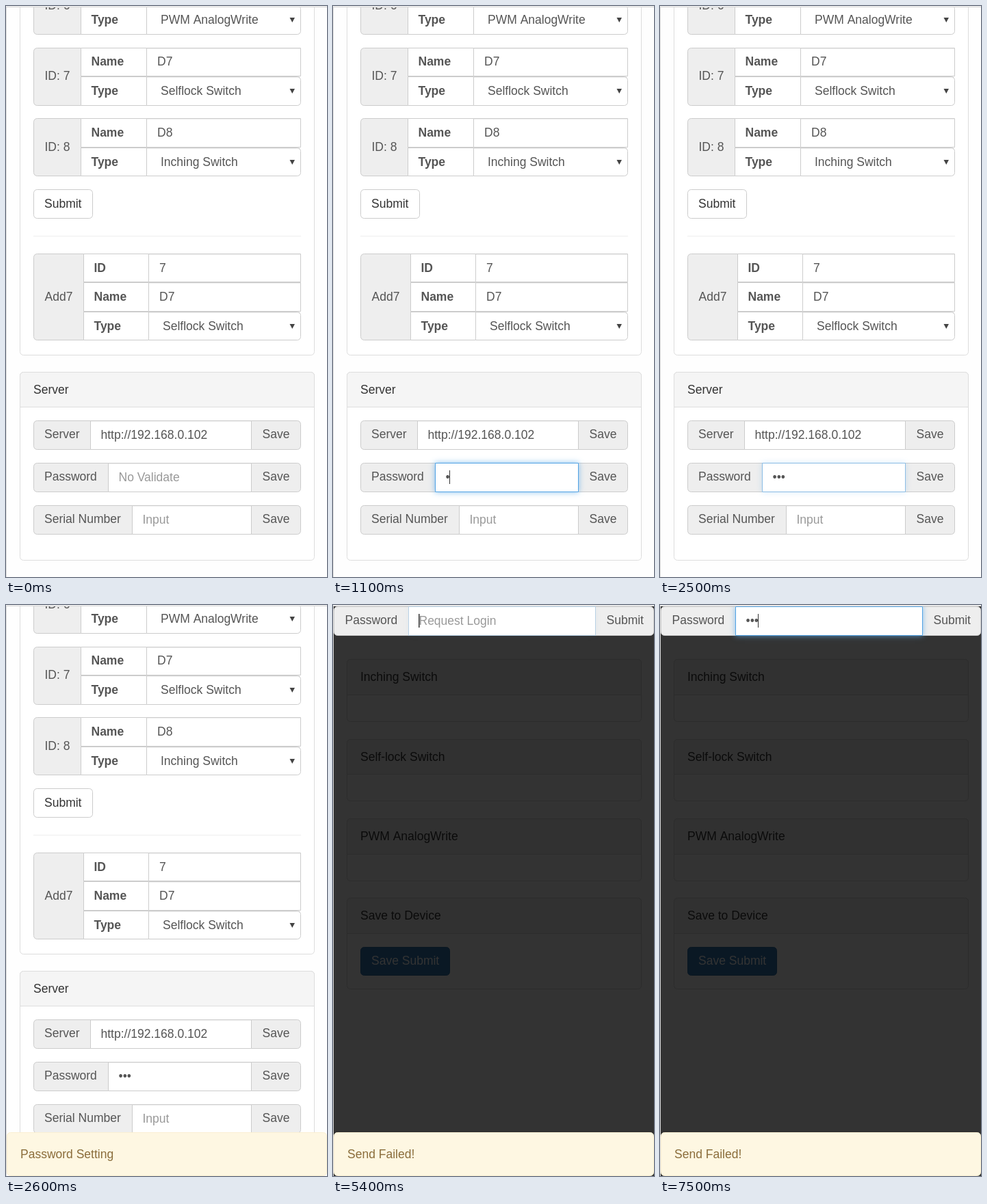
Recreate the animation shown at these times as an HTML page with a canvas. Size 469 px wide and 835 px high, loop 8 s.

```html
<!DOCTYPE html>
<html lang="en">
<head>
<meta charset="utf-8">
<title>Device settings</title>
<style>
html, body { margin: 0; width: 100%; height: 100%; overflow: hidden; background: #fff; }
canvas { display: block; }
</style>
</head>
<body>
<canvas id="stage" width="469" height="835"></canvas>
<script>
const ctx = document.getElementById('stage').getContext('2d');
const W = 469, H = 835, LOOP = 8000;
const GREY = '#555', HINT = '#999', LINE = '#ccc', ADDON = '#eee';
const LEFT = [5, 0, 0, 5], RIGHT = [0, 5, 5, 0];

function rect(x, y, w, h, color) {
  ctx.fillStyle = color;
  ctx.fillRect(x, y, w, h);
}

// Bordered box covering pixels x0..x1, y0..y1 (end exclusive)
function box(x0, y0, x1, y1, fill = '#fff', radii = 0, border = LINE) {
  ctx.beginPath();
  ctx.roundRect(x0 + .5, y0 + .5, x1 - x0 - 1, y1 - y0 - 1, radii);
  ctx.fillStyle = fill;
  ctx.fill();
  ctx.strokeStyle = border;
  ctx.stroke();
}

function text(str, x, y, color = GREY, weight = '') {
  ctx.font = `${weight} 17.5px "Liberation Sans", Arial, sans-serif`;
  ctx.fillStyle = color;
  ctx.fillText(str, x, y);
}

function arrow(y) {
  ctx.fillStyle = '#444';
  ctx.beginPath();
  ctx.moveTo(414.5, y - 3);
  ctx.lineTo(422, y - 3);
  ctx.lineTo(418.25, y + 4);
  ctx.fill();
}

function input(x0, y0, x1, y1, radii) {
  box(x0, y0, x1, y1, '#fff', radii);
  rect(x0 + 1, y0 + 1, x1 - x0 - 2, 1, 'rgba(0,0,0,.06)');
}

// Label column with name/value rows; the last row is a select
function group(y, label, nameX, valueX, rows) {
  const top = i => Math.floor(y + 42.5 * i), n = rows.length;
  box(40, top(0), nameX + 1, top(n), ADDON, LEFT);
  text(label, 56.5, Math.round(y + 21.25 * n + 4.9));
  rows.forEach(([name, value], i) => {
    const select = i === n - 1, base = Math.round(y + 42.5 * i + 26.4);
    box(nameX, top(i), valueX + 1, top(i + 1));
    input(valueX, top(i), 431, top(i + 1), select ? RIGHT : 0);
    text(name, nameX + 15.5, base, GREY, 'bold');
    text(value, valueX + (select ? 21 : 16), base);
    if (select) arrow(base - 6);
  });
}

function panel(y0, y1, headerHeight, title) {
  box(20, y0, 451, y1, '#fff', 5, '#ddd');
  box(20, y0, 451, y0 + headerHeight, '#f5f5f5', [5, 5, 0, 0], '#ddd');
  text(title, 40, y0 + 32 - (y0 < 200 && y0 > 190 ? 0 : 0), '#333');
}

function serverRow(y, label, inputX, value, color) {
  box(40, y, inputX + 1, y + 43, ADDON, LEFT);
  box(358, y, 431, y + 43, ADDON, RIGHT);
  input(inputX, y, 359, y + 43);
  text(label, 56, y + 26);
  text('Save', 374.5, y + 26);
  text(value, inputX + 15.5, y + 27, color);
}

// Password field with focus glow, bullets and caret
function passwordField(x0, y0, x1, hint, state) {
  const { focus, dots, caret } = state, y1 = y0 + 43, textX = x0 + 15.5;
  if (focus) {
    ctx.save();
    ctx.shadowColor = `rgba(102,175,233,${.8 * focus * focus})`;
    ctx.shadowBlur = 8;
    rect(x0, y0, x1 - x0, y1 - y0, '#fff');
    ctx.restore();
  }
  input(x0, y0, x1, y1);
  if (focus) box(x0, y0, x1, y1, '#fff', 0, `rgba(82,163,228,${focus})`);
  text(dots ? '•'.repeat(dots) : hint, textX, y0 + 27, dots ? GREY : HINT);
  if (caret) rect(Math.floor(textX + 6 * dots - (dots ? .5 : 0)), y0 + 11, dots ? 1 : 1.5, 20, '#333');
}

function alertBar(message) {
  box(1, 771, W, H, '#fef7e2', 5, '#faefd2');
  text(message, 21, 809, '#8a6d3b');
}

function settingsPage(t) {
  box(20, -20, 451, 511, '#fff', 5, '#ddd');
  const columns = (name, type) => [['Name', name], ['Type', type]];
  group(-42.6, 'ID: 6', 109, 205, columns('D6', 'PWM AnalogWrite'));
  group(61, 'ID: 7', 109, 205, columns('D7', 'Selflock Switch'));
  group(164.6, 'ID: 8', 109, 205, columns('D8', 'Inching Switch'));
  box(40, 268, 127, 311, '#fff', 5);
  text('Submit', 56, 295, '#333');
  rect(40, 336, 391, 1, '#eee');
  group(362.2, 'Add7', 113, 208, [['ID', '7'], ...columns('D7', 'Selflock Switch')]);

  panel(535, 811, 52, 'Server');
  serverRow(606, 'Server', 123, 'http://192.168.0.102', GREY);
  serverRow(668, 'Password', 149, '', HINT);
  serverRow(730, 'Serial Number', 184, 'Input', HINT);
  passwordField(149, 668, 359, 'No Validate', {
    focus: t < 600 ? 0 : t < 700 ? .3 : t < 2500 ? 1 : t < 2600 ? .6 : 0,
    dots: t < 1100 ? 0 : t < 1400 ? 1 : t < 1600 ? 2 : 3,
    caret: t >= 600 && t < 2100
  });
  if (t >= 2600) alertBar('Password Setting');
}

function loginPage(t) {
  panel(79, 171, 53, 'Inching Switch');
  panel(196, 287, 52, 'Self-lock Switch');
  panel(312, 404, 53, 'PWM AnalogWrite');
  panel(428, 562, 53, 'Save to Device');
  box(40, 500, 171, 542, '#337ab7', 5, '#2e6da4');
  text('Save Submit', 56, 526, '#fff');
  rect(0, 0, W, H, 'rgba(0,0,0,.8)');

  box(1, 2, 111, 45, ADDON, LEFT);
  box(383, 2, W, 45, ADDON, RIGHT);
  text('Password', 17.5, 28);
  text('Submit', 399.5, 28);
  passwordField(110, 2, 384, 'Request Login', {
    focus: t < 5400 ? 0 : t < 5500 ? .3 : 1,
    dots: t < 6100 ? 0 : t < 6400 ? 1 : t < 6600 ? 2 : 3,
    caret: t >= 5400 && t < 5900 || t >= 6100 && t < 7000 || t >= 7500
  });
  alertBar('Send Failed!');
}

function draw(now) {
  const t = now % LOOP;
  rect(0, 0, W, H, '#fefefe');
  (t < 3500 ? settingsPage : loginPage)(t);
  rect(0, 0, W, 1, '#f4f4f4');
  rect(0, 1, W, 1, '#d8d8d8');
  rect(0, 1, 1, H, '#dcdcdc');
  requestAnimationFrame(draw);
}
requestAnimationFrame(draw);
</script>
</body>
</html>
```
